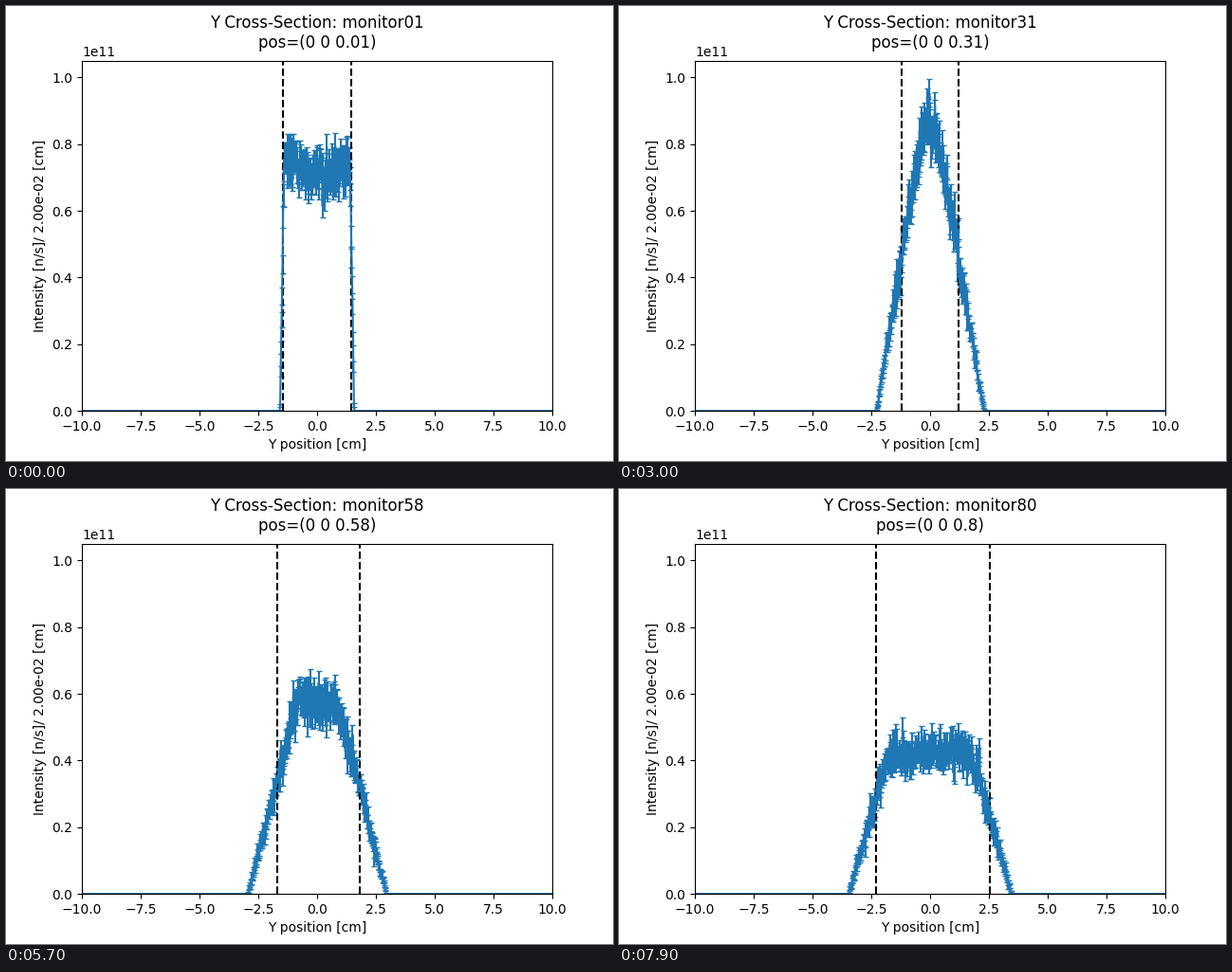
A matplotlib script that plays this animation: 640x480 px, repeating every 8 s.

```python
import numpy as np
import matplotlib.pyplot as plt
from matplotlib.animation import FuncAnimation

FRAMES, STEP = 80, 100
SCALE = 1e11
FLUX = 2.2       # integrated intensity, in units of SCALE
QUANTUM = 0.0018  # intensity carried by one counted event

y_pos = np.linspace(-9.99, 9.99, 1000)


def monitor_at(i):
    """Monitor shown at step i; the first is held and number 10 is absent."""
    return max(1, i) if i < 10 else i + 1


def beam(z):
    """Mean profile: a trapezoid whose core narrows, crosses over and widens."""
    base = 1.55 + 2.4 * z
    core = abs(1.45 - 4 * z)
    top = FLUX / (base + core)
    edge = np.clip(top * (base - np.abs(y_pos)) / (base - core), 0, None)
    dip = 0.05 * np.exp(-z / 0.1)
    roof = top * (1 + dip * (1.5 * (y_pos / base) ** 2 - 0.6))
    low, high = np.minimum(edge, roof), np.maximum(edge, roof)
    return low * (1 + (low / high) ** 20) ** (-1 / 20)


def measure(n):
    rng = np.random.default_rng(n)
    value = rng.poisson(beam(n / 100) / QUANTUM) * QUANTUM
    return value * SCALE, np.sqrt(QUANTUM * value) * SCALE


def limits(z):
    knots = [0.01, 0.09, 0.23, 0.39, 0.5, 0.66, 0.8]
    left = [1.45, 1.41, 1.29, 1.09, 1.41, 1.94, 2.30]
    right = [1.45, 1.41, 1.29, 1.09, 1.49, 2.14, 2.54]
    return -np.interp(z, knots, left), np.interp(z, knots, right)


fig, ax = plt.subplots(figsize=(6.4, 4.8), dpi=100)
value, err = measure(1)
line, caps, (bars,) = ax.errorbar(y_pos, value, yerr=err, capsize=2)
marks = [ax.axvline(x, color="k", linestyle="--") for x in limits(0.01)]
title = ax.set_title("", pad=10)
ax.set(xlim=(-10, 10), ylim=(0, 1.05 * SCALE),
       xlabel="Y position [cm]", ylabel="Intensity [n/s]/ 2.00e-02 [cm]")


def draw(i):
    n = monitor_at(i)
    value, err = measure(n)
    lo, hi = value - err, value + err
    line.set_ydata(value)
    caps[0].set_ydata(lo)
    caps[1].set_ydata(hi)
    bars.set_segments(np.stack([np.column_stack([y_pos, lo]),
                                np.column_stack([y_pos, hi])], axis=1))
    for mark, x in zip(marks, limits(n / 100)):
        mark.set_xdata([x, x])
    title.set_text(f"Y Cross-Section: monitor{n:02d}\npos=(0 0 {n / 100:g})")
    return [line, *caps, bars, *marks, title]


anim = FuncAnimation(fig, draw, frames=FRAMES, interval=STEP,
                     init_func=lambda: draw(0), repeat=True, repeat_delay=0)
plt.show()
```
